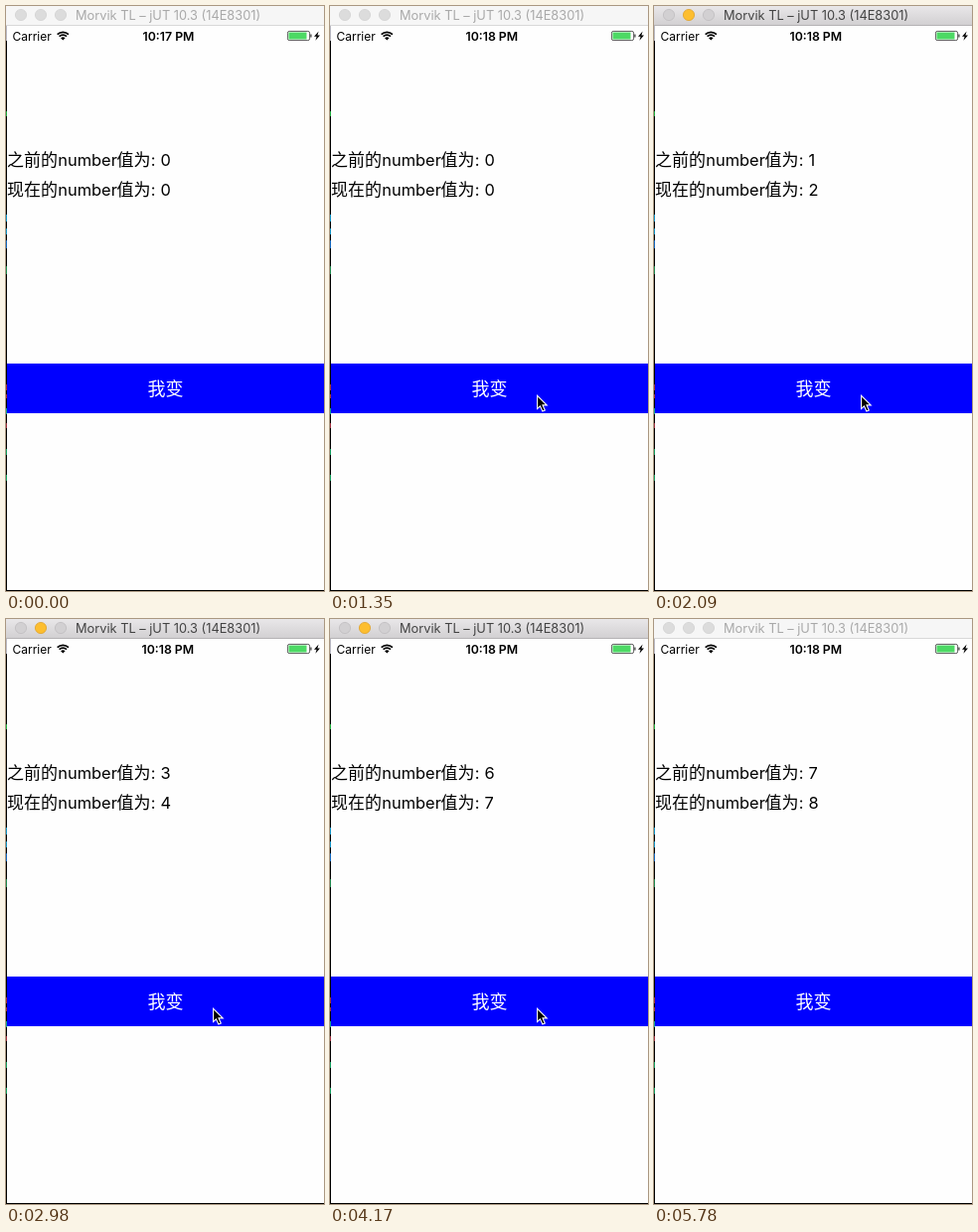
Write an HTML page with a canvas that moves like this. It is 320 by 589 pixels and loops after 5880 ms.

```html
<!DOCTYPE html>
<html lang="zh-CN">
<head>
<meta charset="utf-8">
<title>Counter</title>
<style>
html, body { margin: 0; width: 100%; height: 100%; overflow: hidden; background: #fefefe; }
canvas { display: block; width: 320px; height: 589px; }
</style>
</head>
<body>
<canvas id="stage"></canvas>
<script>
const W = 320, H = 589, LOOP = 5880;
const SANS = 'Inter, "Noto Sans CJK SC", "Noto Sans CJK", sans-serif';
const HAN = '"Noto Sans CJK SC", "Noto Sans CJK", sans-serif';
const canvas = document.getElementById('stage');
const ctx = canvas.getContext('2d');
const ratio = window.devicePixelRatio || 1;
canvas.width = W * ratio;
canvas.height = H * ratio;
ctx.scale(ratio, ratio);

const taps = [1650, 2090, 2540, 2980, 3430, 3720, 4170, 4620];
// time, x, y; no position means the pointer is off stage
const pointer = [
  [0], [450, 313, 456], [600, 235, 347], [750, 216, 354],
  [900, 207, 391], [5060, 240, 550], [5210]
];
// y, height, colour of the slivers of the window behind
const slivers = [
  [20, 15, '#b9b9c4'], [106, 5, '#20b040'], [210, 7, '#1295c8'], [224, 6, '#1295c8'],
  [236, 8, '#1468c0'], [262, 8, '#208a50'], [381, 6, '#a03030'], [391, 4, '#a03030'],
  [405, 6, '#14a090'], [420, 5, '#a03040'], [446, 6, '#14a060'], [472, 6, '#14a060']
];

function rect(x, y, w, h, fill) {
  ctx.fillStyle = fill;
  ctx.fillRect(x, y, w, h);
}

function text(str, x, y, font, fill, align = 'left') {
  ctx.font = font;
  ctx.fillStyle = fill;
  ctx.textAlign = align;
  ctx.fillText(str, x, y);
}

function poly(points, fill) {
  ctx.beginPath();
  points.forEach(([x, y]) => ctx.lineTo(x, y));
  ctx.closePath();
  ctx.fillStyle = fill;
  ctx.fill();
}

function dot(x, fill, edge) {
  ctx.beginPath();
  ctx.arc(x, 9, 5.6, 0, Math.PI * 2);
  ctx.fillStyle = fill;
  ctx.fill();
  ctx.lineWidth = 0.8;
  ctx.strokeStyle = edge;
  ctx.stroke();
}

function titleBar(active) {
  let fill = '#f6f6f6';
  if (active) {
    fill = ctx.createLinearGradient(0, 0, 0, 19);
    fill.addColorStop(0, '#e9e7e9');
    fill.addColorStop(1, '#d2d0d2');
  }
  rect(0, 0, W, 19, fill);
  rect(0, 19, W, 1, active ? '#b4b2b4' : '#d8d8d8');
  const grey = active ? ['#d2d0d2', '#bfbdbf'] : ['#dcdcdc', '#d2d2d2'];
  dot(15, ...grey);
  dot(35, ...(active ? ['#fdbe2f', '#e0a32a'] : grey));
  dot(55, ...grey);
  text('Morvik TL – jUT 10.3 (14E8301)', 70, 14, '12.8px ' + SANS, active ? '#434343' : '#a9a9a9');
}

function wifi() {
  const from = -Math.PI * 0.75, to = -Math.PI * 0.25;
  ctx.strokeStyle = '#000';
  ctx.lineWidth = 1.7;
  for (const r of [8, 5.2]) {
    ctx.beginPath();
    ctx.arc(57.3, 34.3, r, from, to);
    ctx.stroke();
  }
  ctx.beginPath();
  ctx.moveTo(57.3, 34.6);
  ctx.arc(57.3, 34.6, 3.2, from, to);
  ctx.fillStyle = '#000';
  ctx.fill();
}

function battery() {
  ctx.strokeStyle = '#333';
  ctx.lineWidth = 0.8;
  ctx.beginPath();
  ctx.roundRect(283.4, 25.4, 22.2, 9.2, 1.8);
  ctx.stroke();
  rect(284.5, 26.5, 18, 7, '#4cd964');
  rect(306.3, 28.5, 1.2, 3, '#333');
  poly([[314.6, 25.6], [310, 30.8], [312.6, 30.8], [311.4, 34.8], [316, 29.4], [313.4, 29.4]], '#000');
}

function label(han, value, y) {
  const latin = '16.4px ' + SANS;
  text(han, 1, y, '17px ' + HAN, '#000');
  text('number', 52.3, y, latin, '#000');
  text('值为', 111.5, y, '17px ' + HAN, '#000');
  text(':', 145.8, y, latin, '#000');
  text(value, 155.4, y, latin, '#000');
}

function arrow(x, y) {
  ctx.save();
  ctx.translate(x, y);
  ctx.lineJoin = 'miter';
  const shape = [[1.6, 1.4], [1.6, 14.4], [4.5, 11.8], [6.9, 17], [9.3, 16], [7, 10.9], [11.2, 10.9]];
  poly(shape, '#000');
  ctx.strokeStyle = '#fff';
  ctx.lineWidth = 1.1;
  ctx.stroke();
  ctx.restore();
}

function draw(t) {
  const count = taps.filter(at => t >= at).length;
  rect(0, 0, W, H, '#fefefe');
  rect(0, 20, 1, H - 20, '#000');
  rect(0, H - 1, W, 1, '#000');
  slivers.forEach(([y, h, fill]) => rect(0, y, 1, h, fill));
  titleBar(t >= 1650 && t < 5780);

  text('Carrier', 6.5, 34.5, '12px ' + SANS, '#000');
  wifi();
  const late = t >= 1350;
  text(late ? '10:18 PM' : '10:17 PM', late ? 162.8 : 163.5, 34.5, '600 12.3px ' + SANS, '#000', 'center');
  battery();

  label('之前的', Math.max(0, count - 1), 161);
  label('现在的', count, 191);

  rect(1, 360, W - 1, 50, '#00f');
  text('我变', 160.5, 391.5, '18px ' + HAN, '#fff', 'center');

  const [, x, y] = pointer.filter(p => t >= p[0]).pop();
  if (x !== undefined) arrow(x, y);
}

const start = performance.now();
function tick() {
  draw((performance.now() - start) % LOOP);
  requestAnimationFrame(tick);
}
tick();
</script>
</body>
</html>
```
